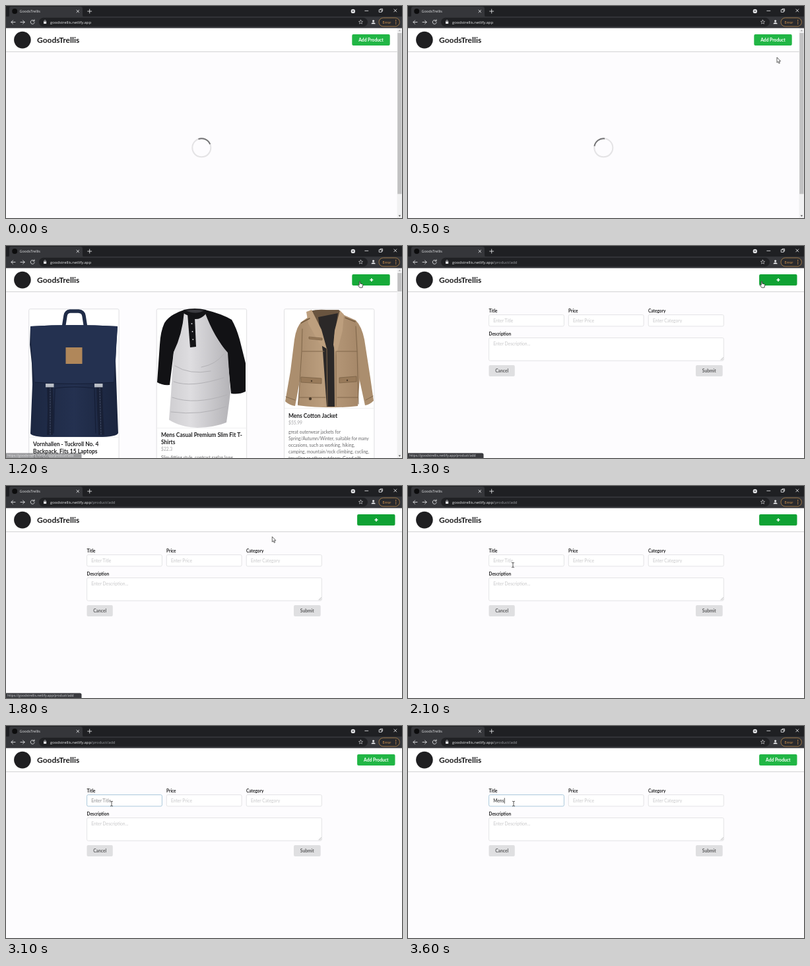
These frames come from a looping animation (600x322 px, 3.7 s). An HTML page:

```html
<!DOCTYPE html>
<html lang="en">
<head>
<meta charset="utf-8">
<title>GoodsTrellis</title>
<style>
html, body { margin: 0; width: 100%; height: 100%; overflow: hidden; background: #fdfcfe; }
svg { display: block; width: 100%; height: 100%; }
text { font-family: Lato, sans-serif; font-size: 6.7px; white-space: pre; }
.ui { font-family: "Open Sans", sans-serif; }
.b { font-weight: 700; }
.label { font-weight: 700; font-size: 6.5px; fill: #1f1f20; }
.hint { fill: #c8c8ca; }
.head { font-weight: 700; font-size: 8.45px; fill: #1f1f20; }
.price { fill: #a2a2a4; }
.desc { fill: #6a6a6c; }
.field { fill: #fff; stroke: #dedee0; stroke-width: .8; }
.line { fill: none; stroke-linecap: round; stroke-linejoin: round; }
</style>
</head>
<body>
<svg viewBox="0 0 600 322" preserveAspectRatio="none">
  <defs>
    <clipPath id="btnClip"><rect x="524.3" y="43" width="57.4" height="17" rx="2"/></clipPath>
    <linearGradient id="navy"><stop offset="0" stop-color="#1c2741"/><stop offset=".5" stop-color="#243150"/><stop offset="1" stop-color="#1a243d"/></linearGradient>
    <linearGradient id="grey"><stop offset="0" stop-color="#cfced1"/><stop offset=".35" stop-color="#dedde0"/><stop offset="1" stop-color="#b4b3b7"/></linearGradient>
    <linearGradient id="tan"><stop offset="0" stop-color="#a98c6d"/><stop offset=".4" stop-color="#bb9e7e"/><stop offset="1" stop-color="#a58768"/></linearGradient>
  </defs>
  <rect width="600" height="322" fill="#fdfcfe"/>

  <g id="loader" fill="none" stroke-width="2">
    <circle cx="296.3" cy="215.3" r="14" stroke="#e4e3e5"/>
    <path id="arc" d="M291.5 202.1A14 14 0 0 1 309.2 209.9" stroke="#747476"/>
  </g>

  <g id="shop">
    <g fill="#fff" stroke="#d9d9db" stroke-width=".8">
      <rect x="34.7" y="95.7" width="136.4" height="240" rx="2"/>
      <rect x="228.2" y="95.7" width="136.4" height="240" rx="2"/>
      <rect x="421.5" y="95.7" width="136.4" height="240" rx="2"/>
      <path d="M35 290.5h136M228.5 276.5h136M421.8 246.5h136" stroke="#ececee"/>
    </g>

    <g id="pack">
      <path class="line" d="M87.500 122L90 106Q91 99.500 97 99L110 99Q117 99.500 118 106L120.500 122" stroke="#202c48" stroke-width="5.500"/>
      <path d="M37 122Q100 118 169 122L167 150L166 175L170 284Q168 290 140 290H62Q41 290 37 285L40 210L39 178L36 150Z" fill="url(#navy)"/>
      <path d="M37 122Q100 118 169 122L166 172L163 207Q104 211 44 207L40 176Z" fill="#243150"/>
      <path class="line" d="M44 207Q104 212 163 207M74 216Q104 212 134 216L136 284M74 216L72 284" stroke="#151e36" stroke-width="1.200"/>
      <path d="M62 211h9l1 38-1 38h-9l1-38zM137 211h9l1 38 2 38h-9l-2-38z" fill="#182036"/>
      <path class="line" d="M67 216V286M142 216L144 286" stroke="#46526d" stroke-width="1" stroke-dasharray="2 2"/>
      <path d="M60 209h12.500v5.500h-12.500zM134 209h12.500v5.500h-12.500z" fill="#b9bec6"/>
      <rect x="90.500" y="154" width="25" height="25" fill="#b0875a"/>
    </g>

    <g id="shirt">
      <path d="M270 97Q248 104 240 117Q234 130 233 150L229 207Q237 212 248 211L254 162L280 112ZM302 97Q327 103 342 112Q349 124 354 142L363 178V221Q353 226 341 224L335 164L298 106Z" fill="#121215"/>
      <path d="M270 100Q267 135 254 161Q252 190 250 225L247 264Q264 275 290 276Q318 275 334 268Q338 240 340 222L336 162Q316 140 301 100Q286 112 270 100Z" fill="url(#grey)"/>
      <path d="M269 97Q286 93 303 97L302 104Q294 112 286 111L284 108Q275 106 269 102Z" fill="#141417"/>
      <path d="M272 98Q286 95 300 98Q288 105 272 98Z" fill="#3b3b40"/>
      <path d="M275 103L286 108L288 153L279 154Z" fill="#141417"/>
      <g fill="#d9d8db"><circle cx="281.500" cy="118" r=".9"/><circle cx="282.500" cy="130" r=".9"/><circle cx="283.300" cy="142" r=".9"/></g>
      <path class="line" d="M256 182Q278 196 310 190M254 206Q280 216 330 200M252 230Q286 242 335 226M250 252Q296 258 333 244M330 164Q318 180 296 184" stroke="#b2b1b5" stroke-width="1"/>
    </g>

    <g id="coat">
      <path d="M461 110L448 115Q440 122 437 142L431 190L423 236Q430 242 438 243L446 200L452 140ZM512 108L530 113Q539 122 543 142L552 200L557 235Q551 241 544 242L536 205L526 140Z" fill="#ab8e6e"/>
      <path d="M462 105L448 115L449 160L442 242Q490 248 533 243L536 200L533 150L530 113L508 103Z" fill="url(#tan)"/>
      <path d="M461 99Q470 96 485 97L504 97Q510 100 509 110L497 135L478 135Z" fill="#69543f"/>
      <path d="M473 108L503 102L497 140L498 244L486 244L480 160Z" fill="#2b2828"/>
      <path d="M455 100L463 97L478 127L486 156L476 150L458 118ZM506 98L512 104L510 128L500 168L496 150L498 128Z" fill="#bd9f7e"/>
      <path class="line" d="M486 156L487 244M500 160L500 243M449 126L448 160L443 240M530 122L532 160L534 240M449 160H482M501 160H532M445 230H484M502 230H533M424 229L438 234M545 234L556 228" stroke="#80674b" stroke-width="1"/>
      <path d="M447 199l31 2v8l-31-2zM505 200l26-2v8l-26 2zM459 138l20 2v3l-20-2z" fill="#987a5a" stroke="#755c41" stroke-width=".7"/>
      <path class="line" d="M447 117L460 110M514 109L529 115" stroke="#755c41" stroke-width="1.500"/>
      <g fill="#4c3c2c"><circle cx="463" cy="205" r="1.200"/><circle cx="517" cy="204" r="1.200"/><circle cx="461" cy="232" r="2.200"/></g>
    </g>

    <text class="head" x="41" y="304">Vornhallen - Tuckroll No. 4</text>
    <text class="head" x="41" y="314.8">Backpack, Fits 15 Laptops</text>
    <text class="price" x="41" y="324">$109.95</text>
    <text class="head" x="235" y="290">Mens Casual Premium Slim Fit T-</text>
    <text class="head" x="235" y="300.6">Shirts</text>
    <text class="price" x="235" y="310.7">$22.3</text>
    <text class="desc" x="235" y="324.2">Slim-fitting style, contrast raglan long</text>
    <text class="head" x="428" y="260.8">Mens Cotton Jacket</text>
    <text class="price" x="428" y="270.7">$55.99</text>
    <text class="desc" x="428" y="284.6">great outerwear jackets for</text>
    <text class="desc" x="428" y="294.6">Spring/Autumn/Winter, suitable for many</text>
    <text class="desc" x="428" y="304.6">occasions, such as working, hiking,</text>
    <text class="desc" x="428" y="314.6">camping, mountain/rock climbing, cycling,</text>
    <text class="desc" x="428" y="324.6">traveling or other outdoors. Good gift</text>
  </g>

  <g id="form">
    <text class="label" x="122.5" y="100.6">Title</text>
    <text class="label" x="243" y="100.6">Price</text>
    <text class="label" x="364" y="100.6">Category</text>
    <text class="label" x="122.5" y="135.8">Description</text>
    <rect id="titleBox" class="field" x="122.6" y="104.5" width="113.8" height="17.4" rx="2"/>
    <rect class="field" x="243.3" y="104.5" width="113.8" height="17.4" rx="2"/>
    <rect class="field" x="364.2" y="104.5" width="114.2" height="17.4" rx="2"/>
    <rect class="field" x="122.6" y="139.5" width="355.8" height="34.8" rx="2"/>
    <path class="line" d="M474 173l3.500-3.500M476 173.200l1.500-1.500" stroke="#8c8c8e" stroke-width=".6"/>
    <text id="titleHint" class="hint" x="129.2" y="115.8">Enter Title</text>
    <text class="hint" x="250" y="115.8">Enter Price</text>
    <text class="hint" x="371" y="115.8">Enter Category</text>
    <text class="hint" x="129.2" y="151.4">Enter Description...</text>
    <text id="typed" x="129.2" y="115.8" fill="#1f1f20"></text>
    <rect id="caret" y="109.3" width=".8" height="8.4" fill="#222"/>
    <g fill="#dfdfe1"><rect x="122.5" y="181" width="39.3" height="17" rx="2"/><rect x="436" y="181" width="40.7" height="17" rx="2"/></g>
    <g class="b" fill="#5b5b5d" text-anchor="middle"><text x="142.2" y="192">Cancel</text><text x="456.3" y="192">Submit</text></g>
  </g>

  <g id="header">
    <rect y="33" width="600" height="36" fill="#fff"/>
    <rect y="69" width="600" height="1" fill="#d3d2d4"/>
    <circle cx="24.9" cy="51.6" r="12.8" fill="#1f1f21"/>
    <text class="b" x="47" y="55.9" style="font-size:12px" fill="#1b1b1c">GoodsTrellis</text>
    <g id="btn">
      <rect id="btnBg" x="524.3" y="43" width="57.4" height="17" rx="2"/>
      <g clip-path="url(#btnClip)">
        <text id="btnText" class="b" x="553" y="53.9" text-anchor="middle" fill="#fff">Add Product</text>
        <path id="plus" d="M550.1 51.5h5M552.6 49v5" stroke="#fff" stroke-width="1.5"/>
      </g>
    </g>
  </g>

  <g id="scroll">
    <rect x="592.6" y="33" width="7.4" height="289" fill="#f1f1f2"/>
    <rect id="thumb" x="593.2" y="41" width="6.3" fill="#c1c1c2"/>
    <path d="M594.7 38.3l1.700-2.200 1.700 2.200z" fill="#a5a5a6"/><path d="M594.7 317.8l1.700 2.200 1.700-2.200z" fill="#505051"/>
  </g>

  <g id="chrome">
    <rect width="600" height="17" fill="#1f2023"/>
    <path d="M2 17Q5 17 5 13V4Q5 1 8 1H113Q116 1 116 4V13Q116 17 119 17Z" fill="#35363a"/>
    <rect y="16" width="600" height="17.6" fill="#35363a"/>
    <circle cx="13.2" cy="8" r="4" fill="#0d0d0e"/>
    <text class="ui" x="20.5" y="10" style="font-size:5.5px" fill="#e6e7e9">GoodsTrellis</text>
    <rect x="50" y="17.8" width="498" height="13.4" rx="6.7" fill="#202124"/>
    <g class="line" stroke="#dfe0e3" stroke-width=".9">
      <path d="M107 6.200l3.600 3.600M110.600 6.200l-3.600 3.600M123.700 8h6M126.700 5v6"/>
      <path d="M14 24.500H8M10.600 21.800L7.900 24.500l2.700 2.700M22 24.500h6M25.500 21.800l2.700 2.700-2.700 2.700"/>
      <path d="M42.500 22.400A3 3 0 1 0 43.200 25M43 20.800v2.200h-2.200"/>
      <path d="M543.800 7.300h5M565.600 5.700h3.600v3.600h-3.600zM567 5.500v-1.200h3.600v3.600h-1.200M587.800 4.900l4 4M591.800 4.900l-4 4"/>
      <path d="M537.500 21.200l.9 2 2.200.2-1.700 1.500.5 2.200-1.900-1.200-1.900 1.200.5-2.200-1.700-1.500 2.200-.2z" stroke-width=".6"/>
      <path d="M57.800 24v-1.200a1.300 1.300 0 0 1 2.600 0V24" stroke-width=".6"/>
    </g>
    <rect x="57" y="23.6" width="4.2" height="3.4" rx=".4" fill="#dfe0e3"/>
    <circle cx="525.8" cy="7.9" r="3.2" fill="#dfe0e3"/><path d="M524.3 7.200h3l-1.500 1.900z" fill="#1f2023"/>
    <circle cx="556.6" cy="22.8" r="1.600" fill="#e6e7e9"/><path d="M553.6 27.300v-.8q.4-1.500 3-1.500t3 1.500v.8z" fill="#e6e7e9"/>
    <rect x="565" y="18" width="31.4" height="13" rx="6.5" fill="#292a2d" stroke="#b98a4c" stroke-width=".8"/>
    <text class="ui" x="570.6" y="26.500" style="font-size:5.400px" fill="#eea553">Error</text>
    <g fill="#eea553"><circle cx="590.7" cy="21.8" r=".7"/><circle cx="590.7" cy="24.4" r=".7"/><circle cx="590.7" cy="27" r=".7"/></g>
    <text class="ui" x="67" y="26.600" style="font-size:5.900px" fill="#e6e7e9">goodstrellis.netlify.app<tspan id="route" fill="#9a9da2">/product/add</tspan></text>
  </g>

  <g id="status">
    <path d="M0 314.500H112Q114.500 314.500 114.500 317V322H0Z" fill="#3a3b3f"/>
    <text class="ui" x="2" y="320.300" style="font-size:5px" fill="#d3d4d7">https://goodstrellis.netlify.app/product/add</text>
  </g>

  <g id="arrow"><path d="M0 0V8L1.800 6.400L3 9.300L4.300 8.700L3.100 5.900H5.600Z" fill="#fff" stroke="#222" stroke-width=".7"/></g>
  <g id="hand"><path d="M-.8 .5Q0-.5 .8 .5V3.600L4 4.300Q5 4.700 4.700 6.500L4 9.600H-.2L-2.800 6Q-2.500 4.700-.8 6Z" fill="#fff" stroke="#222" stroke-width=".8"/></g>
  <g id="beam"><path class="line" d="M-1.600-3.700Q0-3.700 0-2.800Q0-3.700 1.600-3.700M0-2.800V2.800M-1.600 3.700Q0 3.700 0 2.800Q0 3.700 1.600 3.700" stroke="#333" stroke-width=".8"/></g>
</svg>
<script>
const LOOP = 3700, STEP = 100;
const LOADED = 600, HOVER = 940, ROUTED = 1300, CLICKED = 2300;
const KEYS = [3200, 3400, 3500, 3600];
const PATH = [
  [300, 600, 62], [500, 559, 78], [600, 548, 85], [700, 547, 82], [900, 540, 62],
  [1200, 536, 53.5], [1600, 536, 53.5], [2100, 159, 120], [2200, 160, 118]
];

const el = {};
document.querySelectorAll("[id]").forEach(n => el[n.id] = n);
const set = (id, name, value) => el[id].setAttribute(name, value);
const show = (id, on) => { el[id].style.display = on ? "" : "none"; };
const clamp = v => Math.min(1, Math.max(0, v));
const smooth = p => p * p * (3 - 2 * p);

// CSS "ease": cubic-bezier(.25, .1, .25, 1)
function ease(p) {
  let lo = 0, hi = 1, u = p;
  for (let i = 0; i < 20; i++) {
    u = (lo + hi) / 2;
    const x = .75 * u * (1 - u) + u ** 3;
    if (x < p) lo = u; else hi = u;
  }
  return p <= 0 ? 0 : p >= 1 ? 1 : .3 * u * (1 - u) ** 2 + 3 * u * u * (1 - u) + u ** 3;
}

function pointer(t) {
  const i = PATH.findIndex(p => p[0] > t);
  if (i < 0) return PATH[PATH.length - 1].slice(1);
  const [t0, x0, y0] = PATH[i - 1], [t1, x1, y1] = PATH[i];
  const raw = (t - t0) / (t1 - t0), p = t1 - t0 > 300 ? smooth(raw) : raw;
  return [x0 + (x1 - x0) * p, y0 + (y1 - y0) * p];
}

function drawPointer(t) {
  const kinds = ["arrow", "hand", "beam"];
  if (t < PATH[0][0]) return kinds.forEach(k => show(k, false));
  const [x, y] = pointer(t);
  const onBtn = y < 60 && y > 43 && x > 524 && (t < ROUTED || x > 532);
  const onField = t >= ROUTED && y > 104 && y < 122 && (x < 236 || x > 243 && x < 357 || x > 364 && x < 478);
  const kind = onBtn ? "hand" : onField ? "beam" : "arrow";
  kinds.forEach(k => show(k, k === kind));
  set(kind, "transform", `translate(${x} ${y})`);
}

function drawButton(t) {
  const p = t < CLICKED ? ease(clamp((t - HOVER) / 300)) : 1 - ease(clamp((t - CLICKED) / 300));
  set("btnText", "transform", `translate(${-114.8 * p} 0)`);
  set("plus", "transform", `translate(${57.4 * (1 - p) + .6} 0)`);
  set("btn", "transform", `translate(${t < ROUTED ? 0 : 7.8} 0)`);
  set("btnBg", "fill", t < HOVER || t >= CLICKED + 100 ? "#21b645" : t < ROUTED ? "#16aa39" : "#0fa234");
}

function drawTitle(t) {
  const focus = t >= CLICKED;
  const count = KEYS.filter(k => t >= k).length;
  el.typed.textContent = "Mens".slice(0, count);
  show("titleHint", !count);
  el.titleHint.style.fill = focus ? "#8e8e90" : "";
  el.titleBox.style.stroke = focus ? "#96bcd3" : "";
  show("caret", focus && (count || (t - CLICKED) % 1000 < 500));
  set("caret", "x", 129.2 + (count ? el.typed.getComputedTextLength() + .3 : 0));
}

function draw(t) {
  const routed = t >= ROUTED;
  show("loader", t < LOADED);
  set("arc", "transform", `rotate(${t * .6} 296.3 215.3)`);
  show("shop", t >= LOADED && !routed);
  show("form", routed);
  show("route", routed);
  show("scroll", !routed);
  set("thumb", "height", t < LOADED ? 244.5 : 28);
  show("status", t > 1100 && t < 1950);
  set("status", "opacity", clamp((t - 1100) / 200) * clamp((1950 - t) / 150));
  drawButton(t);
  drawTitle(t);
  drawPointer(t);
}

const start = performance.now();
function tick() {
  const t = (performance.now() - start) % LOOP;
  draw(Math.floor(t / STEP) * STEP);
  requestAnimationFrame(tick);
}
tick();
</script>
</body>
</html>
```
